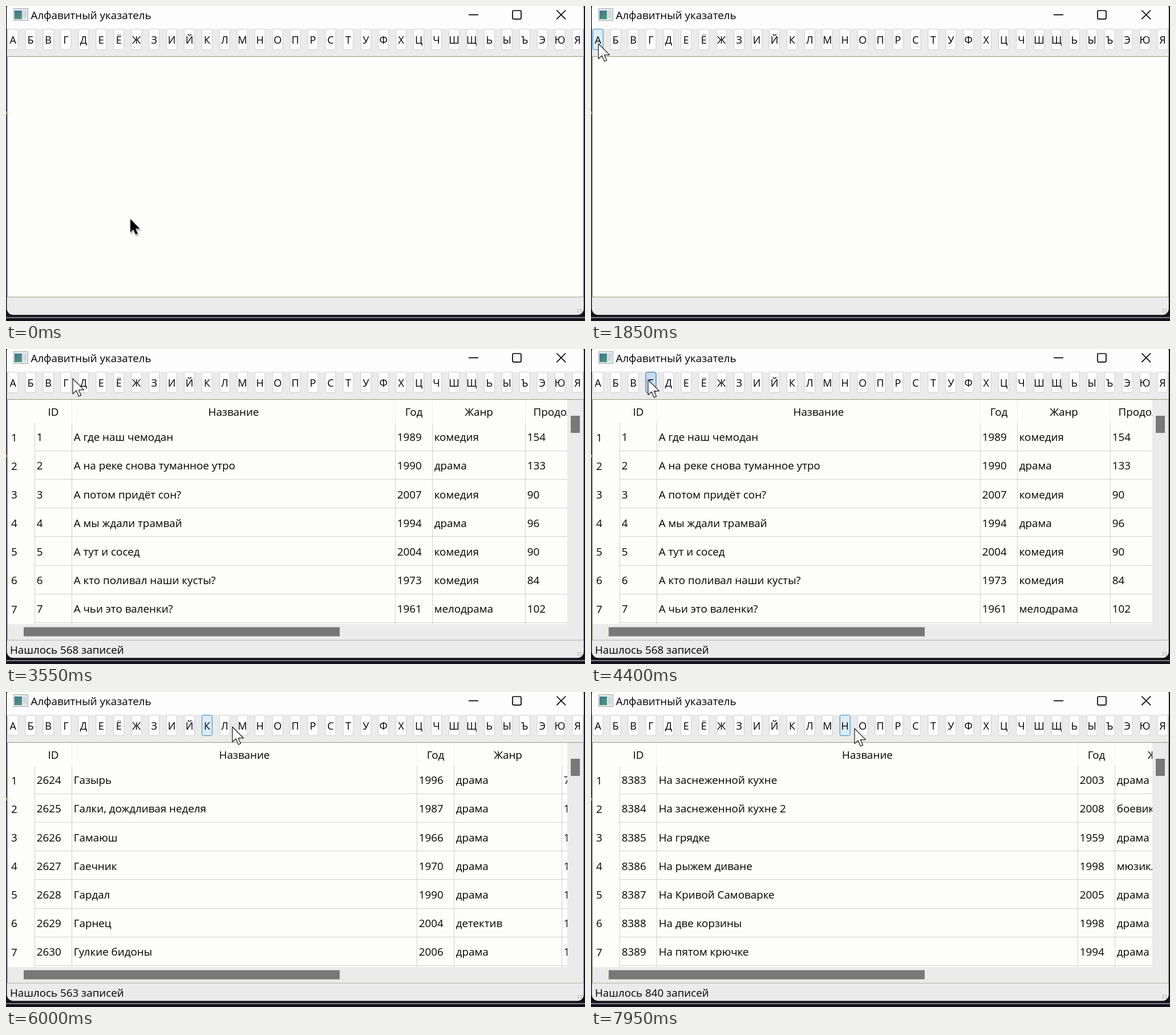
Animation of 1015x552 px, one loop 8 s. Source, as an HTML page:

```html
<!DOCTYPE html>
<html lang="ru">
<head>
<meta charset="utf-8">
<title>Алфавитный указатель</title>
<style>
html, body { margin: 0; width: 100%; height: 100%; overflow: hidden; background: #14131c; }
svg { display: block; width: 1015px; height: 552px; }
text { font: 18.8px "Open Sans", "Noto Sans", sans-serif; fill: #000; }
.key text { font-size: 18px; text-anchor: middle; }
.key rect { fill: #fdfdfd; stroke: #cfcfd2; }
.key.hover rect { fill: #dcedf8; stroke: #2a86cf; }
.key.down rect { fill: #c3def3; stroke: #1d5f96; }
.mid { text-anchor: middle; }
.grid { stroke: #d2d2d0; fill: none; }
.bar { fill: #787878; }
</style>
</head>
<body>
<svg id="stage" viewBox="0 0 1015 552" width="1015" height="552">
  <defs>
    <linearGradient id="pane" x1="0" y1="0" x2="1" y2="1">
      <stop offset="0" stop-color="#3f719a"/><stop offset="1" stop-color="#4f9c74"/>
    </linearGradient>
    <clipPath id="win"><rect x="1.5" y="-7" width="1011.3" height="548.2" rx="11"/></clipPath>
    <clipPath id="view"><rect x="2" y="89" width="982" height="393"/></clipPath>
  </defs>
  <rect width="1015" height="552" fill="#14131c"/>
  <rect y="185" width="1.5" height="5" fill="#b8813c"/>
  <rect y="545.3" width="1015" height="1.5" fill="#a3a3a8"/>
  <g clip-path="url(#win)">
    <rect width="1015" height="542" fill="#ebebeb"/>
    <rect width="1015" height="40" fill="#fdfdfd"/>
    <g id="icon">
      <rect x="13.5" y="4.5" width="25" height="21" fill="#e3e8ea" stroke="#a5abb0"/>
      <rect x="15" y="8" width="13" height="15" fill="url(#pane)"/>
      <path d="M30 10H36M30 13H36M30 16H36M30 19H36" stroke="#a9b9c2" stroke-width="1.2"/>
    </g>
    <text x="43.5" y="23.3">Алфавитный указатель</text>
    <g fill="none" stroke="#000" stroke-width="1.7">
      <path d="M811 15.3H828M965.3 7.5L981 23.2M981 7.5L965.3 23.2"/>
      <rect x="888" y="8" width="15" height="14.8" rx="2"/>
    </g>
    <g id="keys"></g>
    <rect x="2.5" y="88.5" width="1009.5" height="421.5" fill="#fdfdfb" stroke="#979983"/>
    <g id="tables"></g>
    <g id="bars">
      <path d="M984 89H1011.5V509.5H3V482H984Z" fill="#ebebeb"/>
      <rect class="bar" x="990" y="117" width="16" height="30"/>
      <rect class="bar" x="31" y="487.5" width="554" height="16"/>
    </g>
    <text id="status" x="7" y="533.8"></text>
    <path d="M1002 532h2m3 0h2m-7 4h2m3 0h2" stroke="#a6a6a6" stroke-width="2"/>
  </g>
  <g id="cursor">
    <path id="dark" d="M0 0V23.5L5.3 18.7L9.2 27.5L13 25.8L9.2 17.2H16.5Z" fill="#000"
      stroke="#fff" stroke-width="1.6" paint-order="stroke" style="filter:drop-shadow(1px 2px 1px #0005)"/>
    <path id="light" d="M0 0V26.5L6.2 21L10.6 31L14.6 29.2L10.3 19.6H19.5Z" fill="#fff"
      stroke="#222" stroke-width="1.3" stroke-linejoin="round"/>
  </g>
</svg>
<script>
const NS = 'http://www.w3.org/2000/svg';
const LOOP = 8000;
const LETTERS = 'АБВГДЕЁЖЗИЙКЛМНОПРСТУФХЦЧШЩЬЫЪЭЮЯ';
const ROW = 50.15;
const STEP = 30.93;
const LAST_WIDTH = 216;
const $ = id => document.getElementById(id);

function add(parent, tag, attrs, content) {
  const el = document.createElementNS(NS, tag);
  for (const k in attrs) el.setAttribute(k, attrs[k]);
  if (content !== undefined) el.textContent = content;
  parent.appendChild(el);
  return el;
}

// cols: left edges of title, year, genre and length
const tables = [
  { from: 2250, id: 1, count: 568, cols: [115.5, 682.5, 747.5, 910.5], rows: [
    'А где наш чемодан|1989|комедия|154',
    'А на реке снова туманное утро|1990|драма|133',
    'А потом придёт сон?|2007|комедия|90',
    'А мы ждали трамвай|1994|драма|96',
    'А тут и сосед|2004|комедия|90',
    'А кто поливал наши кусты?|1973|комедия|84',
    'А чьи это валенки?|1961|мелодрама|102'] },
  { from: 4450, id: 2624, count: 563, cols: [115.5, 720.5, 785.5, 974.5], rows: [
    'Газырь|1996|драма|75',
    'Галки, дождливая неделя|1987|драма|110',
    'Гамаюш|1966|драма|161',
    'Гаечник|1970|драма|134',
    'Гардал|1990|драма|144',
    'Гарнец|2004|детектив|107',
    'Гулкие бидоны|2006|драма|105'] },
  { from: 7300, id: 8383, count: 840, cols: [115.5, 853.5, 918.5, 1082.5], rows: [
    'На заснеженной кухне|2003|драма|207',
    'На заснеженной кухне 2|2008|боевик|180',
    'На грядке|1959|драма|134',
    'На рыжем диване|1998|мюзикл|90',
    'На Кривой Самоварке|2005|драма|95',
    'На две корзины|1998|драма|96',
    'На пятом крючке|1994|драма|88'] }
];

function buildTable(t) {
  const g = add($('tables'), 'g', { 'clip-path': 'url(#view)' });
  const edges = [50.5, ...t.cols, t.cols[3] + LAST_WIDTH];
  ['ID', 'Название', 'Год', 'Жанр', 'Продолжительность'].forEach((name, i) =>
    add(g, 'text', { class: 'mid', x: (edges[i] + edges[i + 1]) / 2, y: 117 }, name));
  let d = '';
  edges.forEach(x => d += `M${x} 130V482`);
  t.rows.forEach((line, r) => {
    const y = 161.2 + r * ROW;
    add(g, 'text', { x: 9, y: y + 0.5 }, r + 1);
    [t.id + r, ...line.split('|')].forEach((s, c) =>
      add(g, 'text', { x: edges[c] + 3.2, y }, s));
    d += `M50 ${Math.round(178 + r * ROW) + 0.5}H984`;
  });
  add(g, 'path', { class: 'grid', d });
  add(g, 'path', { class: 'grid', opacity: 0.35, d: edges.slice(1).map(x => `M${x} 90V130`).join('') });
  return g;
}

const keys = [...LETTERS].map((ch, i) => {
  const x = 12 + i * STEP;
  const g = add($('keys'), 'g', { class: 'key' });
  const clip = add(g, 'clipPath', { id: 'k' + i });
  add(clip, 'rect', { x: x - 8.5, y: 40, width: 17, height: 37 });
  add(g, 'rect', { x: x - 8.8, y: 40.5, width: 18, height: 36, rx: 3 });
  add(g, 'text', { x: x + 0.2, y: 66, 'clip-path': `url(#k${i})` }, ch);
  return g;
});
const groups = tables.map(buildTable);

// time, x, y of the pointer
const path = [
  [0, 218, 373], [150, 218, 373], [1050, 59, 132], [1650, 13, 66], [2700, 13, 66],
  [3450, 117, 52], [3650, 117, 52], [3950, 100, 54], [5300, 100, 54],
  [6300, 478, 63], [6650, 478, 63], [6950, 446, 64], [7800, 448, 64],
  [7950, 462, 64], [8000, 464, 64]
];
// letter index, press, release
const presses = [[0, 2100, 2620], [3, 4250, 4470], [14, 7130, 7330]];

function pointer(t) {
  let i = 1;
  while (i < path.length - 1 && t > path[i][0]) i++;
  const [t0, x0, y0] = path[i - 1], [t1, x1, y1] = path[i];
  const p = Math.max(0, Math.min(1, (t - t0) / (t1 - t0)));
  const e = p * p * (3 - 2 * p);
  return [x0 + (x1 - x0) * e, y0 + (y1 - y0) * e];
}

function keyAt([x, y]) {
  const i = Math.round((x - 12) / STEP);
  return y > 40 && y < 77 && Math.abs(x - 12 - i * STEP) < 9.5 ? i : -1;
}

function draw(t) {
  const pos = pointer(t);
  $('cursor').setAttribute('transform', `translate(${pos[0]} ${pos[1]})`);
  const onBar = pos[1] < 88;
  $('dark').style.display = onBar ? 'none' : '';
  $('light').style.display = onBar ? '' : 'none';

  // highlight trails the pointer slightly
  const over = keyAt(pointer(Math.max(0, t - 100)));
  const press = presses.find(p => t >= p[1] && t < p[2]);
  keys.forEach((k, i) => k.setAttribute('class',
    'key' + (press && press[0] === i ? ' down' : i === over ? ' hover' : '')));

  let shown = -1;
  tables.forEach((tb, i) => { if (t >= tb.from) shown = i; });
  groups.forEach((g, i) => g.style.display = i === shown ? '' : 'none');
  $('bars').style.display = shown < 0 ? 'none' : '';
  $('status').textContent = shown < 0 ? '' : `Нашлось ${tables[shown].count} записей`;
}

const start = performance.now();
function tick() {
  draw((performance.now() - start) % LOOP);
  requestAnimationFrame(tick);
}
tick();
</script>
</body>
</html>
```
